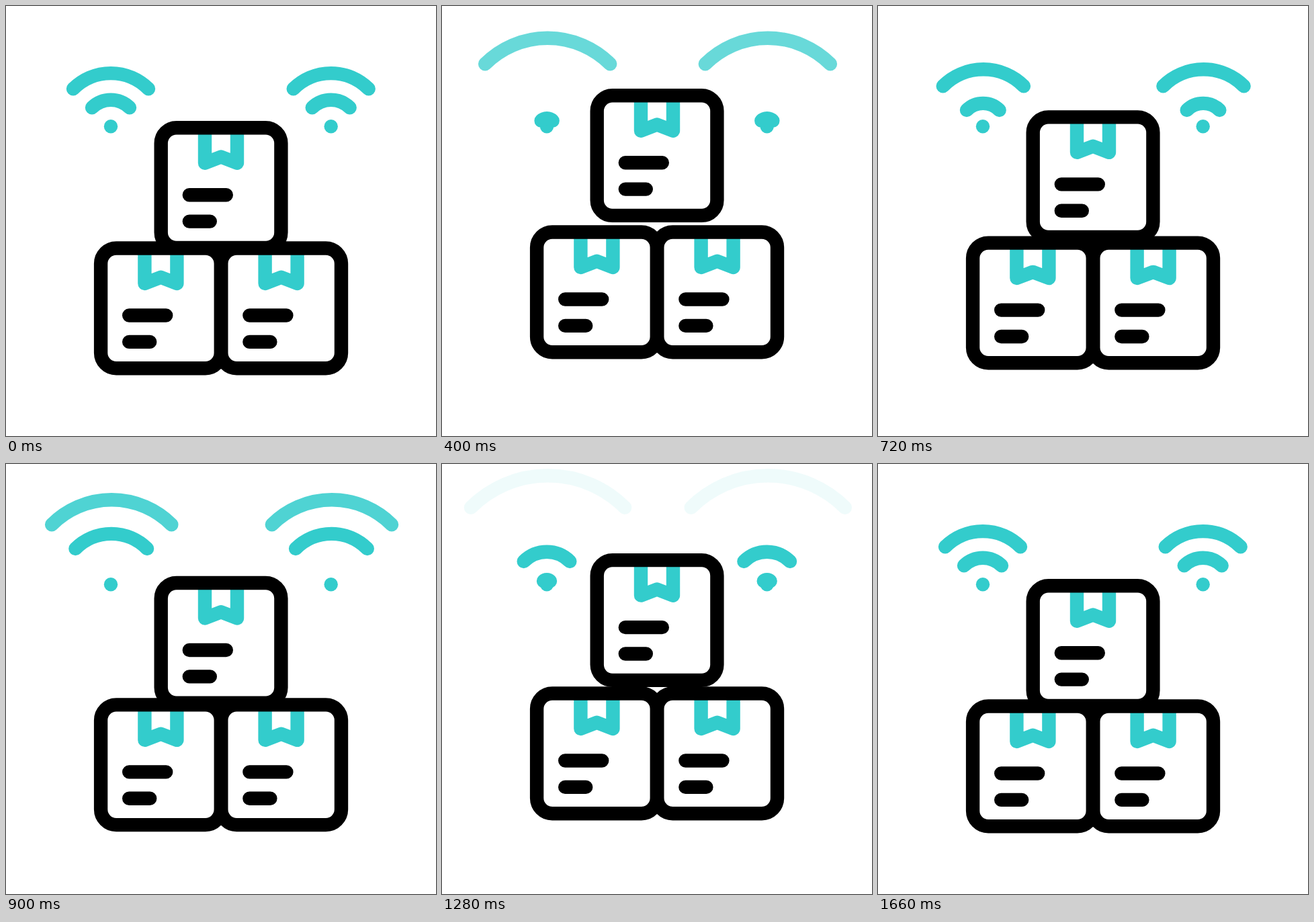
Recreate the animation shown at these times as an HTML page. Size 640 by 640 pixels, loop 2.4 s.

```html
<!DOCTYPE html>
<html lang="en">
<head>
<meta charset="utf-8">
<title>Connected parcels</title>
<style>
  html, body { margin: 0; width: 100%; height: 100%; overflow: hidden; background: #fff; }
  svg { display: block; width: 100%; height: 100%; }
</style>
</head>
<body>
<svg viewBox="0 0 640 640" fill="none" stroke-width="20.4" stroke-linecap="round" stroke-linejoin="round">
  <defs>
    <g id="box">
      <rect x="230.7" y="181.2" width="178.7" height="178.7" rx="23" fill="#fff"/>
      <path d="M296 184V233.7L320 224.5L344 233.7V184" stroke="#3cc"/>
      <rect x="230.7" y="181.2" width="178.7" height="178.7" rx="23" stroke="#000"/>
      <path d="M272.8 281.2H327.8M272.8 320.6H303.8" stroke="#000"/>
    </g>
    <g id="signal" stroke="#3cc">
      <circle cx="156" cy="179.3" r="10.2" fill="#3cc" stroke="none"/>
    </g>
  </defs>
  <use href="#signal"/>
  <use href="#signal" x="327.7"/>
  <use id="top" href="#box"/>
  <g id="base">
    <use href="#box" x="-89.6" y="179.3"/>
    <use href="#box" x="89.6" y="179.3"/>
  </g>
</svg>
<script>
const LOOP = 2400, STEP = 20, REACH = 117, LIFT = 48;
const $ = id => document.getElementById(id);
const clamp = v => Math.min(1, Math.max(0, v));
const part = (t, a, b) => clamp((t - a) / (b - a));
const smooth = u => u * u * (3 - 2 * u);

const speedUp = u => u ** 1.3;
const slowDown = u => 1 - (1 - u) ** 1.5;
const steady = u => u;

// Each wave grows from one half-width to another over its time span.
const waves = [
  { start: 0, end: 335, from: 56, to: REACH, ease: speedUp },
  { start: 0, end: 509, from: 28, to: REACH, ease: speedUp },
  { start: 347, end: 1073, from: 0, to: REACH, ease: steady },
  { start: 569, end: 1295, from: 0, to: REACH, ease: steady },
  { start: 980, end: 1620, from: 0, to: 56, ease: slowDown },
  { start: 1227, end: 1660, from: 0, to: 28, ease: slowDown }
];
for (const wave of waves) {
  wave.path = document.createElementNS("http://www.w3.org/2000/svg", "path");
  $("signal").append(wave.path);
}

function drawWave({ start, end, from, to, ease, path }, t) {
  const u = ease(part(t, start, end));
  const w = from + (to - from) * u;
  const x = 156 + (to === REACH ? 1.6 * u : 0);
  const y = 179.3 - w, r = w * Math.SQRT2;
  path.setAttribute("d", `M${x - w} ${y}A${r} ${r} 0 0 1 ${x + w} ${y}`);
  path.setAttribute("opacity", t < start ? 0 : clamp((REACH - w) / 32.5));
}

function lift(t) {
  const ramp = (a, b) => smooth(part(t, a, b));
  return LIFT * (ramp(0, 263) - ramp(520, 845) + ramp(845, 1146) - ramp(1146, 1603));
}

function draw(now) {
  const t = Math.floor(now % LOOP / STEP) * STEP;
  for (const wave of waves) drawWave(wave, t);
  const h = lift(t);
  $("top").setAttribute("transform", `translate(0 ${-h})`);
  $("base").setAttribute("transform", `translate(0 ${-h / 2})`);
}

let begin;
function tick(now) {
  begin ??= now;
  draw(now - begin);
  requestAnimationFrame(tick);
}
draw(0);
requestAnimationFrame(tick);
</script>
</body>
</html>
```
